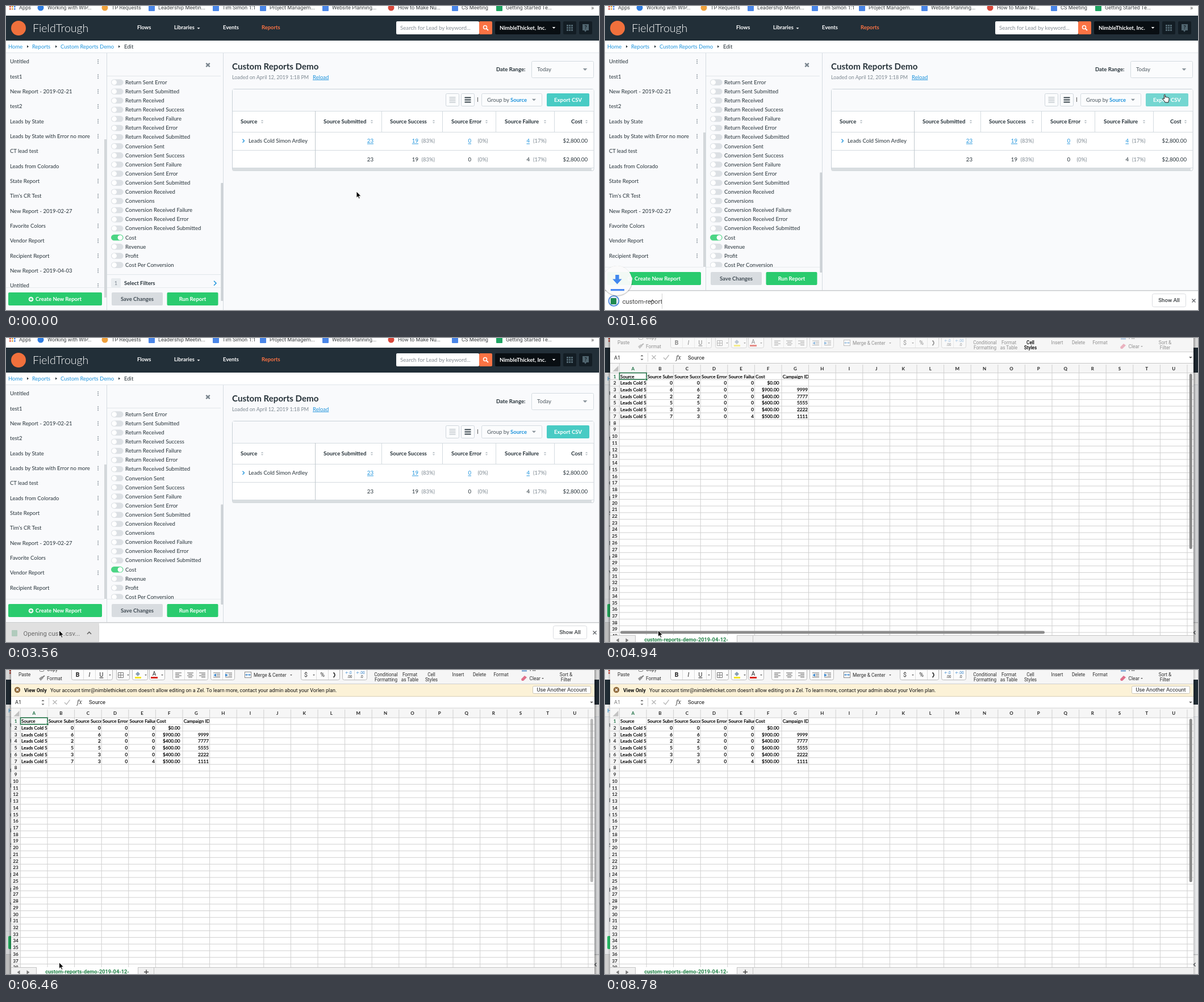
Write an HTML page that moves like this. It is 1044 px wide and 536 px high and loops after 8880 ms.

```html
<!DOCTYPE html>
<html lang="en">
<head>
<meta charset="utf-8">
<title>Report export</title>
<style>
html, body { margin: 0; width: 100%; height: 100%; overflow: hidden; background: #fff; }
svg { display: block; }
#stage { position: fixed; left: 0; top: 0; }
text { white-space: pre; }
.ui { font-family: Lato, "Open Sans", sans-serif; }
.sys { font-family: Roboto, Inter, sans-serif; }
.serif { font-family: "Noto Serif", "Liberation Serif", serif; font-style: italic; }
.cell { font-family: Lato, "Open Sans", sans-serif; stroke: #000; stroke-width: .25px; }
</style>
</head>
<body>
<svg id="stage" width="1044" height="536"></svg>
<script>
const NS = 'http://www.w3.org/2000/svg';
const LOOP = 8880;
const INK = '#27333a', BLUE = '#1d93dc', GREEN = '#2acb6e', GREY = '#7d8891', RULE = '#d4dbe0';

function set(node, attrs) {
  for (const k in attrs) node.setAttribute(k, attrs[k]);
  return node;
}
function add(parent, tag, attrs) {
  return parent.appendChild(set(document.createElementNS(NS, tag), attrs || {}));
}
const group = (p, attrs) => add(p, 'g', attrs);
const rect = (p, x, y, w, h, fill, more) => add(p, 'rect', { x, y, width: w, height: h, fill, ...more });
const box = (p, x, y, w, h, fill, stroke, r = 2) => rect(p, x + .5, y + .5, w - 1, h - 1, fill, { stroke, rx: r });
const dot = (p, cx, cy, r, fill, more) => add(p, 'circle', { cx, cy, r, fill, ...more });
const line = (p, d, stroke, w = 1, more) => add(p, 'path', { d, stroke, 'stroke-width': w, fill: 'none', ...more });
const shape = (p, d, fill, more) => add(p, 'path', { d, fill, ...more });

// y is the middle of the capitals
function text(p, str, x, y, size, fill, more) {
  const t = add(p, 'text', { x, y: y + size * .36, 'font-size': size, fill, class: 'ui', ...more });
  t.textContent = str;
  return t;
}
const BOLD = { 'font-weight': 700 }, MID = { 'text-anchor': 'middle' }, END = { 'text-anchor': 'end' };
const SYS = { class: 'sys' }, SYSMID = { class: 'sys', ...MID };

// A window that clips its content while keeping stage coordinates
function clip(p, x, y, w, h) {
  const frame = add(p, 'svg', { x, y, width: w, height: h });
  return { frame, g: group(frame, { transform: `translate(${-x} ${-y})` }) };
}
const down = (p, x, y, r, fill) => shape(p, `M${x - r} ${y - r * .5}h${2 * r}l${-r} ${r}z`, fill);
const up = (p, x, y, r, fill) => shape(p, `M${x - r} ${y + r * .5}h${2 * r}l${-r} ${-r}z`, fill);

const stage = document.getElementById('stage');

// ---------- web page ----------
const page = group(stage);
rect(page, 0, 0, 1044, 536, '#f9fafc');
rect(page, 0, 0, 1044, 17, '#fff');

const marks = [
  ['Apps', 23], ['Working with WIP...', 73, '#2f7de1', 1], ['TP Requests', 186, '#f0a13c', 1],
  ['Leadership Meetin...', 268, '#4a86e8'], ['Tim Simon 1:1', 381, '#4a86e8'],
  ['Project Managem...', 464, '#4a86e8'], ['Website Planning...', 574, '#4a86e8'],
  ['How to Make Nu...', 690, '#d9483b', 1], ['CS Meeting', 802, '#4a86e8'],
  ['Getting Started Te...', 880, '#1fa463']];
marks.forEach(([name, x, color, round]) => {
  text(page, name, x, 3, 9.2, '#3c4043', SYS);
  if (!color) return;
  if (round) dot(page, x - 12, 3, 5.5, color);
  else rect(page, x - 17, -3, 11, 12, color, { rx: 1 });
});
['#e0503f', '#e0a23f', '#4a86e8'].forEach((c, i) => {
  rect(page, 6 + i * 4, 0, 2.6, 2.6, c);
  rect(page, 6 + i * 4, 4, 2.6, 2.6, c);
});
text(page, '»', 1030, 3, 11, '#555', SYS);

rect(page, 0, 17, 1044, 44, '#222f38');
dot(page, 22, 39, 13, '#f0703c');
text(page, 'FieldTrough', 47, 38.5, 19.6, '#fff', { 'font-weight': 300 });
[['Flows', 231], ['Libraries', 296], ['Events', 382], ['Reports', 450, '#fb7344']].forEach(([s, x, c]) =>
  text(page, s, x, 38, 9.4, c || '#fff', BOLD));
down(page, 339, 39.5, 2.5, '#fff');
rect(page, 687, 27, 146, 23, '#fff', { rx: 2 });
text(page, 'Search for Lead by keyword...', 694, 38.5, 9.7, '#858d94');
rect(page, 833, 27, 23, 23, '#fb7344', { rx: 2 });
dot(page, 843.5, 37.5, 3, 'none', { stroke: '#fff', 'stroke-width': 1.5 });
line(page, 'M845.8 39.8l3.2 3.2', '#fff', 1.8);
rect(page, 861, 27, 115, 23, '#090e12', { rx: 2 });
text(page, 'NimbleThicket, Inc.', 869, 38.5, 9.7, '#fff', BOLD);
down(page, 964.5, 38.5, 2.8, '#fff');
rect(page, 981, 27, 23, 23, '#131d24', { rx: 2 });
rect(page, 1009, 27, 23, 23, '#131d24', { rx: 2 });
for (let i = 0; i < 9; i++) rect(page, 987 + i % 3 * 4, 33 + (i / 3 | 0) * 4, 3, 3, '#50656f');
shape(page, 'M1015 32h11v11h-4l-2 3-2-3h-3z', '#50656f');
text(page, '?', 1020.5, 37.5, 9, '#131d24', { ...BOLD, ...MID });

rect(page, 0, 61, 1044, 22, '#fff');
line(page, 'M0 82.5H1044', '#dfe5ea');
[['Home', 4], ['Reports', 46], ['Custom Reports Demo', 96]].forEach(([s, x]) => text(page, s, x, 71.5, 9.45, BLUE));
text(page, 'Edit', 208, 71.5, 9.5, INK);
[37, 87, 198].forEach(x => shape(page, `M${x} 69.3l3 2.2-3 2.2z`, INK));

// report list
const list = clip(page, 0, 83, 177, 413);
['Untitled', 'test1', 'New Report - 2019-02-21', 'test2', 'Leads by State',
  'Leads by State with Error no more', 'CT lead test', 'Leads from Colorado', 'State Report',
  "Tim's CR Test", 'New Report - 2019-02-27', 'Favorite Colors', 'Vendor Report', 'Recipient Report',
  'New Report - 2019-04-03', 'Untitled'].forEach((s, i) => {
  const y = 98 + i * 26.33;
  text(list.g, s, 7, y, 9.5, INK);
  [-3, 0, 3].forEach(d => rect(list.g, 161.2, y + d - .9, 1.8, 1.8, '#98a2aa'));
});
const listBar = rect(page, 173, 235, 4.5, 279, '#d3d7da');

// field switches
line(page, 'M177.5 83V536M382.5 83V536', RULE);
line(page, 'M178 123.5H378', '#e1e6ea');
line(page, 'M352.3 100.8l6.4 6.4M358.7 100.8l-6.4 6.4', '#7a858e', 2.4);
const panel = clip(page, 178, 124, 200, 372);
const kinds = ['', ' Success', ' Failure', ' Error', ' Submitted'];
['Return Sent Error', 'Return Sent Submitted',
  ...kinds.map(k => 'Return Received' + k), ...kinds.map(k => 'Conversion Sent' + k),
  'Conversion Received', 'Conversions', ...kinds.slice(2).map(k => 'Conversion Received' + k),
  'Cost', 'Revenue', 'Profit', 'Cost Per Conversion'].forEach((s, i) => {
  const y = 134.6 + i * 16.1, on = s === 'Cost';
  rect(panel.g, 185, y - 5.3, 21.5, 10.6, on ? '#4cd585' : '#dce0e4', { rx: 5.3 });
  dot(panel.g, on ? 201 : 190.5, y, 4.4, '#fff');
  text(panel.g, s, 210, y - .2, 9.6, INK);
});
line(panel.g, 'M178 473.5H378', '#e1e6ea');
rect(panel.g, 185, 480, 17, 16, '#e9edf0', { rx: 2 });
text(panel.g, '1', 193.5, 488.5, 9.3, GREY, MID);
text(panel.g, 'Select Filters', 208, 488.5, 9.5, INK, BOLD);
line(panel.g, 'M366 484.8l4 4-4 4', BLUE, 1.5);
const panelBar = rect(page, 378.3, 312, 4, 208, '#cdd2d6', { rx: 1 });

const foot = group(page);
line(foot, 'M0 496.5H173M178 496.5H378', '#e7ebee');
const create = rect(foot, 4, 505, 165, 23, GREEN, { rx: 2 });
dot(foot, 44, 517, 4.3, '#fff');
line(foot, 'M41.5 517h5M44 514.5v5', GREEN, 1.4);
text(foot, 'Create New Report', 52, 516.7, 9.5, '#fff', BOLD);
rect(foot, 186, 505, 90, 23, '#d8dce0', { rx: 2 });
text(foot, 'Save Changes', 231, 516.7, 9.5, '#424d55', { ...BOLD, ...MID });
rect(foot, 283.5, 505, 90, 23, GREEN, { rx: 2 });
text(foot, 'Run Report', 328.5, 516.7, 9.5, '#fff', { ...BOLD, ...MID });

// report
text(page, 'Custom Reports Demo', 398, 107, 15.1, INK, BOLD);
text(page, 'Loaded on April 12, 2019 1:18 PM', 398, 125.3, 8.95, GREY);
text(page, 'Reload', 540, 125.3, 9.5, BLUE, { 'text-decoration': 'underline' });
text(page, 'Date Range:', 863, 112, 9.5, INK, BOLD);
box(page, 925, 97, 110, 30, '#fbfcfd', RULE);
text(page, 'Today', 935, 112, 9.6, '#4b565e');
down(page, 1019.5, 112, 3.8, '#8b959d');

box(page, 398, 146, 637.5, 145, '#fff', '#c9d1d7', 3);
rect(page, 399, 147, 635.5, 38, '#f9fafc');
rect(page, 399, 286, 632, 4.5, '#d9dde0');
line(page, 'M399 185.5H1035M399 222.5H1035M399 254.5H1035M399 285.5H1035', RULE);
line(page, 'M544.5 185V286', '#bfc7cd');
line(page, 'M661.5 185V222M768.5 185V222M862.5 185V222M965.5 185V222', RULE);
[774, 801].forEach((x, i) => {
  box(page, x, 154, 24, 23, '#fbfcfd', '#cfd6dc');
  const ys = i ? [161.5, 165.5, 169.5] : [161, 164, 167, 170];
  ys.forEach(y => line(page, `M${x + 6.5} ${y}h11`, i ? '#39454d' : '#a9b2b9', i ? 2 : 1));
});
line(page, 'M830.5 161v8', '#555');
box(page, 837, 154, 107, 23, '#fbfcfd', RULE);
text(page, 'Group by', 847, 165.5, 9.6, '#4b565e');
text(page, 'Source', 888, 165.5, 9.5, BLUE, BOLD);
down(page, 929.5, 165.5, 3.6, '#8b959d');
const exportBox = rect(page, 952, 154, 75, 23, '#48cbc4', { rx: 2 });
text(page, 'Export CSV', 989.5, 165.5, 9.6, '#fff', { ...BOLD, ...MID });

[['Source', 413, 451], ['Source Submitted', 559, 644], ['Source Success', 676, 753],
  ['Source Error', 784, 846], ['Source Failure', 878, 949], ['Cost', 995, 1022]].forEach(([s, x, a]) => {
  text(page, s, x, 203.7, 9.6, INK, BOLD);
  up(page, a, 201.8, 2.2, '#b6bec4');
  down(page, a, 205.8, 2.2, '#b6bec4');
});
line(page, 'M416.5 234.8l3 3-3 3', BLUE, 1.3);
text(page, 'Leads Cold Simon Ardley', 427, 238, 9.6, INK);
[238, 270.3].forEach((y, i) => {
  const look = i ? {} : { 'text-decoration': 'underline' }, color = i ? INK : BLUE;
  [['23', 647], ['19', 726], ['0', 819], ['4', 922]].forEach(([s, x]) =>
    text(page, s, x, y, 9.6, color, { ...END, ...look }));
  [['(83%)', 755], ['(0%)', 848.5], ['(17%)', 951.5]].forEach(([s, x]) => text(page, s, x, y, 9.4, GREY, END));
  text(page, '$2,800.00', 1024, y, 9.6, INK, END);
});

// ---------- download shelf ----------
const shelf = group(page);
rect(shelf, 0, 501, 1044, 35, '#fff');
rect(shelf, 0, 501, 1044, 1.5, '#c9cbcd');
const item = clip(shelf, 0, 502.5, 164, 34);
const itemBack = rect(item.g, 0, 502, 164, 34, '#e0e0e0');
const ring = dot(item.g, 15.5, 520, 9, '#dfeaf9', { stroke: '#3f7fd8', 'stroke-width': 1.6 });
const fileIcon = rect(item.g, 10, 515, 10, 11, '#1f8a50', { rx: 1 });
const fileName = text(item.g, '', 30.5, 521, 11.2, '#4a4a4a', SYS);
const chevron = line(item.g, 'M-3.5 522l3.5-3.5 3.5 3.5', '#666', 1.6);
const itemEdge = rect(shelf, 163, 507, 1, 27, '#d4d4d4');
box(shelf, 963, 507, 60, 24, '#fff', '#dadce0', 3);
text(shelf, 'Show All', 993, 519, 9.6, '#3c4043', { ...SYSMID, 'font-weight': 500 });
line(shelf, 'M1033.5 516.5l6 6M1039.5 516.5l-6 6', '#5f6368', 1.3);

const drop = group(stage);
dot(drop, 0, 1, 27, '#000', { opacity: .18 });
dot(drop, 0, 0, 26, '#fbfbfb');
shape(drop, 'M-3.2 -10h6.4v7.5h5L0 6.5 -8.2 -2.5h5z', '#4285f4');
rect(drop, -11.5, 15, 24, 3.2, '#4285f4');

// ---------- spreadsheet ----------
const book = group(stage);
const shade = rect(book, 0, 0, 1044, 536, '#000', { opacity: .2 });
const shadow = group(book);
for (let i = 0; i < 4; i++) rect(shadow, 8 - i, 0, 1029 + 2 * i, 536, '#000', { opacity: .07 });
rect(book, 9, 0, 1027, 536, '#fff');

const sheet = group(book);
rect(sheet, 9, 24, 1027, 37, '#fff');
line(sheet, 'M9 44.5H1036', '#c6c6c6');
line(sheet, 'M75.5 26V42', '#d5d5d5');
const cellName = text(sheet, 'A1', 16, 34.5, 9.2, '#222', SYS);
up(sheet, 65, 31, 2.5, '#666');
down(sheet, 65, 38, 2.5, '#666');
line(sheet, 'M82.5 30.5l7 7M89.5 30.5l-7 7M103 34.5l3.5 3.5 6-8', '#b5b5b5', 1.3);
text(sheet, 'fx', 125, 34, 10.5, '#444', { class: 'serif' });
text(sheet, 'Source', 146, 34.3, 9.4, '#111', SYS);
down(sheet, 1031, 34.5, 2.8, '#555');
rect(sheet, 9, 45, 1027, 16, '#f6f6f6');
rect(sheet, 9, 61, 16, 475, '#f6f6f6');
shape(sheet, 'M23.5 49v10h-10z', '#c2c2c2');

const COL = 47.6, ROW = 11.735;
let grid = 'M9 61.5H1036M25.4 45V536';
for (let i = 1; i <= 21; i++) grid += `M${25.4 + i * COL} 47V536`;
for (let i = 1; i <= 40; i++) grid += `M9 ${61.5 + i * ROW}H1036`;
line(sheet, grid, '#d0d0d0');
for (let i = 0; i < 21; i++)
  text(sheet, String.fromCharCode(65 + i), 49.2 + i * COL, 53.7, 8, i ? '#222' : '#1f7145', { ...BOLD, ...MID });
for (let i = 0; i < 40; i++)
  text(sheet, i + 1, 17, 67.6 + i * ROW, 8.2, i ? '#222' : '#1f7145', { ...MID, ...BOLD });

const who = 'Leads Cold Simon Ardley';
[['Source', 'Source Submitted', 'Source Success', 'Source Error', 'Source Failure', 'Cost', 'Campaign ID'],
  [who, 0, 0, 0, 0, '$0.00', ''], [who, 6, 6, 0, 0, '$900.00', 9999], [who, 2, 2, 0, 0, '$400.00', 7777],
  [who, 5, 5, 0, 0, '$600.00', 5555], [who, 3, 3, 0, 0, '$400.00', 2222], [who, 7, 3, 0, 4, '$500.00', 1111]
].forEach((cells, r) => cells.forEach((v, c) => {
  const x = 25.4 + c * COL, y = 61 + r * ROW;
  const cell = clip(sheet, x, y, COL - .5, ROW);
  const left = r === 0 || c === 0;
  const edge = c === 5 ? 4.5 : 1.5;
  text(cell.g, v, left ? x + 1.7 : x + COL - edge, y + 6.6, 8.2, '#000', { class: 'cell', ...(left ? {} : END) });
}));
const pick = group(sheet);
rect(pick, 25.5, 61.5, 47.5, 11.5, 'none', { stroke: '#1f7145', 'stroke-width': 1.6 });
rect(pick, 71, 71, 4, 4, '#1f7145', { stroke: '#fff', 'stroke-width': .7 });

const note = group(book);
rect(note, 9, 24, 1027, 22.5, '#fcf2d7');
line(note, 'M9 24.5H1036M9 46.5H1036', '#d9cfb5');
dot(note, 20, 35, 5.2, '#8f6a3c');
line(note, 'M18 33l4 4M22 33l-4 4', '#fff', 1.2);
text(note, 'View Only', 32, 35.5, 8.9, '#111', { ...SYS, 'font-weight': 700 });
text(note, "Your account timr@nimblethicket.com doesn't allow editing on a Zel. To learn more, contact your admin about your Vorlen plan.",
  78, 35.5, 8.98, '#111', SYS);
box(note, 927, 28, 103, 14, '#fff', '#c9c4b6');
text(note, 'Use Another Account', 978.5, 35, 9.4, '#222', SYSMID);

// ribbon
rect(book, 9, 0, 1027, 24, '#f6f6f6');
line(book, 'M9 24.5H1036', '#cfcfcf');
const tools = group(book);
const label = (s, x, y) => text(tools, s, x, y, 8.4, '#2d2d2d', SYS);
const mid = (s, x, y) => text(tools, s, x, y, 8.2, '#2d2d2d', SYSMID);
label('Paste', 22, 8.2);
label('Copy', 72, -1);
label('Format', 72, 15);
box(tools, 59, -6, 8, 9, '#fff', '#777', 1);
shape(tools, 'M58 15l5-4 3 3-5 5z', '#9a9a9a');
line(tools, 'M64 13l4-3', '#777', 2);
[[115, 73], [194, 24], [222, 28], [252, 28], [293, 63], [360, 43], [519, 69], [592, 44]].forEach(([x, w]) =>
  box(tools, x, -5, w, 23, '#fcfcfc', '#b9b9b9', 3));
line(tools, 'M136.5 0V17M157.5 0V17M178.5 0V17M314.5 0V17M335.5 0V17M381.5 0V17M546.5 0V17M567.5 0V17M613.5 0V17', '#ddd');
text(tools, 'B', 126, 8.5, 10.5, '#222', { ...SYSMID, 'font-weight': 700 });
text(tools, 'I', 147, 8.5, 10.5, '#222', { ...SYSMID, 'font-style': 'italic' });
text(tools, 'U', 168, 8.5, 10.5, '#222', { ...SYSMID, 'text-decoration': 'underline' });
[183, 215, 246, 275, 502, 542, 945].forEach((x, i) => down(tools, x, i === 6 ? 15 : 9, 1.8, '#555'));
line(tools, 'M197.5 4.5h9v9h-9zM202 4.5v9M197.5 9h9', '#777');
shape(tools, 'M228 7l4-4 4 4-4 4z', '#8aa0b5');
rect(tools, 227, 12, 11, 3, '#f5e626');
text(tools, 'A', 261, 6.5, 10, '#222', SYSMID);
rect(tools, 255, 12, 12, 3, '#d8261c');
[298, 319, 340].forEach((x, k) => [5, 7.5, 10, 12.5].forEach((y, i) => {
  const w = i % 2 ? 7 : 11;
  line(tools, `M${x + (11 - w) * k / 2} ${y}h${w}`, '#666');
}));
[365, 386].forEach((x, k) => {
  [5, 12.5].forEach(y => line(tools, `M${x} ${y}h12`, '#777'));
  line(tools, `M${x + 6} 7.5h6M${x + 6} 10h6`, '#777');
  shape(tools, k ? `M${x} 6.5v5l5-2.5z` : `M${x + 5} 6.5v5l-5-2.5z`, '#2f7fc8');
});
box(tools, 420, 3, 12, 11, '#fff', '#888', 0);
line(tools, 'M422 8.5h8M424 6.5l-2 2 2 2M428 6.5l2 2-2 2', '#2f7fc8');
label('Merge & Center', 436, 9);
text(tools, '$', 528, 8.5, 10.5, '#333', SYSMID);
text(tools, '%', 557, 8.5, 10.5, '#333', SYSMID);
line(tools, 'M576.5 4.5q5 4 0 8.5', '#333', 1.8);
[['.0', '.00', 603], ['.00', '.0', 624]].forEach(([a, b, x]) => {
  text(tools, '←' + a, x, 5, 6.5, '#2f7fc8', SYSMID);
  text(tools, b, x + 2, 12, 6.5, '#333', SYSMID);
});
mid('Conditional', 669, 8.2);
mid('Formatting', 669, 16.7);
mid('Format', 711, 8.2);
mid('as Table', 711, 16.7);
const styles = [['Cell', 8.2], ['Styles', 16.7]].map(([s, y]) => text(book, s, 749, y, 8.2, '#2d2d2d', SYSMID));
mid('Insert', 796, 8.2);
mid('Delete', 833.5, 8.2);
mid('Format', 871.5, 8.2);
label('Fill', 922, -1.5);
label('Clear', 921.5, 15);
rect(tools, 908, -4, 9, 7, '#8fb3d9');
shape(tools, 'M907 16l6-6 4 3-6 6h-3z', '#e0708a');
mid('Sort &', 986, 8.2);
mid('Filter', 986, 16.7);

const vBar = rect(book, 1028.8, 63, 5, 309, '#8c8c8c', { rx: 2.5 });
const hBar = rect(book, 27, 516.5, 747, 5, '#8c8c8c', { rx: 2.5 });
rect(book, 9, 524, 1027, 12, '#f1f1f1');
line(book, 'M9 524.5H1036', '#c4c4c4');
rect(book, 53, 524, 179, 12, '#fff');
line(book, 'M53.5 524V536M232.5 524V536M260.5 524V536', '#c4c4c4');
shape(book, 'M24.5 529.5v7l-5-3.5z', '#777');
shape(book, 'M36.5 529.5v7l5-3.5z', '#777');
text(book, 'custom-reports-demo-2019-04-12-', 143, 531.3, 9.2, '#1f8045', { ...SYSMID, 'font-weight': 700 });
const plus = line(book, 'M243 532.5h8M247 528.5v8', '#444', 1.4);

// ---------- pointers ----------
const arrow = shape(stage, 'M0 0V11.2L2.6 8.9 4.4 13 6.2 12.2 4.5 8.2H8z', '#000',
  { stroke: '#fff', 'stroke-width': .9 });
const hand = shape(stage,
  'M-2.5 -6.5c1-1 2 0 2 1v3.5l1-.8 1.2.9 1.2-.5 1 1 1.2-.2.9 1.2v3l-1.2 4.4h-5.5l-2.5-3.4-2.3-3 .8-1 2.2 1.2z',
  '#fff', { stroke: '#111', 'stroke-width': 1 });

// ---------- timeline: each row holds from its time on ----------
const POINTER = [
  [0, 617, 327], [440, 655, 312], [600, 800, 242], [760, 940, 180], [920, 987, 163, 1],
  [2010, 955, 195], [2180, 720, 310], [2350, 330, 430], [2520, 108, 504],
  [2670, 101, 509], [2820, 96, 513], [2970, 93.5, 515.5],
  [7390, 95, 519], [7540, 98, 526], [7690, 102, 533], [7830, 106, 545]];
const SHELF = [[0, 0, 0], [1510, 18, 50], [1660, 36, 101], [1840, 36, 146], [2010, 36, 164]];
const DROP = [[0, 0, 0], [1510, 456, .6], [1660, 484, .96], [1840, 504, .4], [2010, 0, 0]];
const CREATE = [[0, GREEN], [2350, '#25b561'], [2670, '#27bf67'], [2820, '#29c76b'], [2970, GREEN]];
const ICON = [[0, 1], [3260, .7], [3410, .45], [3560, .25]];
const V_BAR = [[0, 1], [6460, .6], [6640, 0], [7390, .6], [7540, 1]];
const H_BAR = [[0, 1], [5080, .5], [5320, 0]];

function at(table, t) {
  let row = table[0];
  for (const r of table) if (r[0] <= t) row = r;
  return row;
}
const show = (node, on) => node.style.display = on ? '' : 'none';

function draw(t) {
  const [, rise, width] = at(SHELF, t), k = rise / 36;
  set(list.frame, { height: 413 - rise });
  set(panel.frame, { height: 372 - rise });
  set(listBar, { y: 235 - 12 * k, height: 279 - 42 * k });
  set(panelBar, { y: 312 - 18.5 * k, height: 208 - 31.5 * k });
  set(foot, { transform: `translate(0 ${-rise})` });
  set(create, { fill: at(CREATE, t)[1] });
  set(exportBox, { fill: t >= 920 && t < 2010 ? '#74d6d1' : '#48cbc4' });

  show(shelf, rise > 0);
  set(shelf, { transform: `translate(0 ${36 - rise})` });
  set(item.frame, { width });
  set(itemEdge, { x: width - 1 });
  set(chevron, { transform: `translate(${width - 17.5} 0)` });
  show(itemBack, t >= 2520);
  show(ring, t < 2180);
  set(fileIcon, { opacity: at(ICON, t)[1] });
  fileName.textContent = t < 2010 ? 'custom-reports-demo' : t < 3260 ? 'custom-rep....csv' : 'Opening cust...csv...';
  set(fileName, { fill: t < 3260 ? '#3f3f3f' : '#6a6a6a' });

  const [, dropY, dropA] = at(DROP, t);
  set(drop, { transform: `translate(21.5 ${dropY})`, opacity: dropA });

  const open = t >= 4940, noted = t >= 5080, ready = t >= 5530, idle = t >= 8780;
  show(book, open);
  if (open) {
    set(sheet, { transform: `translate(0 ${noted ? 22.7 : 0})` });
    show(note, noted);
    set(tools, { opacity: ready ? 1 : .5 });
    styles.forEach(s => set(s, { fill: ready ? '#2d2d2d' : '#000', 'font-weight': ready ? 400 : 500 }));
    show(plus, ready);
    show(pick, !idle);
    set(cellName, { fill: idle ? '#777' : '#222' });
    set(shade, { opacity: idle ? .07 : .16 });
    set(shadow, { opacity: idle ? .5 : 1 });
    set(vBar, { y: noted ? 86 : 63, height: noted ? 288 : 309, opacity: at(V_BAR, t)[1] });
    set(hBar, { opacity: at(H_BAR, t)[1] });
  }

  const [, x, y, isHand] = at(POINTER, t);
  show(arrow, !isHand);
  show(hand, isHand);
  set(isHand ? hand : arrow, { transform: `translate(${x} ${y})` });
}

const start = performance.now();
function tick() {
  draw((performance.now() - start) % LOOP);
  requestAnimationFrame(tick);
}
tick();
</script>
</body>
</html>
```
